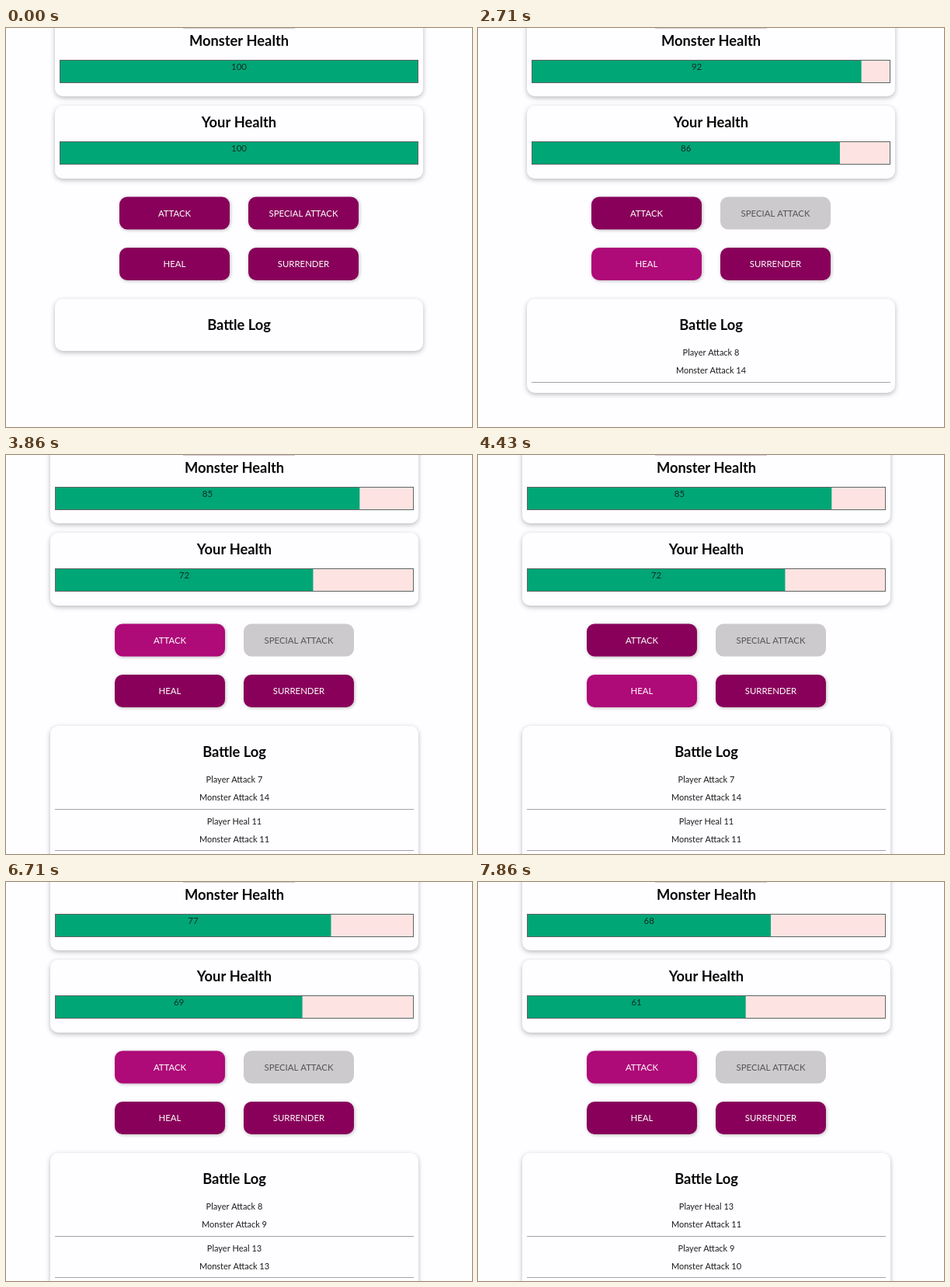
An HTML page with a canvas for the animation above (8000 ms loop, 600 by 514 pixels).

```html
<!DOCTYPE html>
<html lang="en">
<head>
<meta charset="utf-8">
<title>Monster battle</title>
<style>
html, body { margin: 0; width: 100%; height: 100%; overflow: hidden; background: #fefdff; }
canvas { display: block; width: 600px; height: 514px; }
</style>
</head>
<body>
<canvas id="stage" width="600" height="514"></canvas>
<script>
const ctx = document.getElementById('stage').getContext('2d');
const LOOP = 8000;
const FONT = 'Lato, "Open Sans", sans-serif';

// Time, player action, amount, monster damage
const rounds = [
  [2130, 'Attack', 8, 14],
  [2850, 'Heal', 11, 11],
  [3710, 'Attack', 7, 14],
  [4710, 'Heal', 13, 11],
  [5130, 'Heal', 15, 11],
  [5560, 'Heal', 13, 13],
  [5990, 'Attack', 8, 9],
  [6990, 'Attack', 9, 10],
  [7420, 'Heal', 13, 11]
];

// Time and the button under the pointer from then on
const hovers = [
  [0, ''], [1285, 'ATTACK'], [2425, 'HEAL'], [3425, 'ATTACK'], [4425, 'HEAL'],
  [5850, 'ATTACK'], [6285, 'HEAL'], [6705, 'ATTACK'], [7270, 'HEAL'], [7855, 'ATTACK']
];

function stateAt(t) {
  const log = rounds.filter(r => r[0] <= t);
  let monster = 100, player = 100;
  for (const [, action, amount, damage] of log) {
    if (action === 'Heal') player = Math.min(100, player + amount);
    else monster -= amount;
    player -= damage;
  }
  const hover = hovers.filter(h => h[0] <= t).pop()[1];
  return { log, monster, player, hover };
}

function shadow(color, x, y, blur) {
  ctx.shadowColor = color;
  ctx.shadowOffsetX = x;
  ctx.shadowOffsetY = y;
  ctx.shadowBlur = blur;
}

function box(x, y, w, h, r, fill) {
  ctx.fillStyle = fill;
  ctx.beginPath();
  ctx.roundRect(x, y, w, h, r);
  ctx.fill();
}

function text(str, x, y, size, color, weight = 400) {
  ctx.font = `${weight} ${size}px ${FONT}`;
  ctx.fillStyle = color;
  ctx.fillText(str, x, y);
}

function panel(title, cx, y, h, titleY) {
  ctx.save();
  shadow('rgba(0,0,0,.28)', 0, 2, 6);
  box(cx - 237, y, 474, h, 10, '#fefdff');
  ctx.restore();
  text(title, cx, titleY, 18.3, '#080808', 700);
}

function bar(value, cx, y) {
  const x = cx - 231, w = 461 * value / 100;
  ctx.fillStyle = '#fde4e2';
  ctx.fillRect(x, y, 462, 30);
  ctx.fillStyle = '#00a676';
  ctx.fillRect(x + 0.5, y, w, 30);
  ctx.strokeStyle = '#5d6663';
  ctx.lineWidth = 1;
  ctx.strokeRect(x + 0.5, y + 0.5, 461, 29);
  text(value, x + 0.5 + w / 2, y + 13, 11.5, '#142b23');
}

function button(label, x, y, hover, disabled) {
  ctx.save();
  if (!disabled) shadow('rgba(0,0,0,.26)', 1, 1, 4);
  box(x, y, 142, 42, 10, disabled ? '#cccacc' : hover ? '#ae0a78' : '#88005a');
  ctx.restore();
  text(label, x + 71, y + 25, 11.4, disabled ? '#565456' : '#fff');
}

function battleLog(log, cx) {
  panel('Battle Log', cx, 349, 67 + 54 * log.length, 389);
  log.slice(-2).reverse().forEach(([, action, amount, damage], i) => {
    const y = 422 + i * 53.5;
    text(`Player ${action} ${amount}`, cx, y, 11, '#1c1c1c');
    text(`Monster Attack ${damage}`, cx, y + 23, 11, '#1c1c1c');
    ctx.fillStyle = '#a3a1a4';
    ctx.fillRect(cx - 231, Math.floor(y + 34), 462, 1);
  });
}

function draw(t) {
  const { log, monster, player, hover } = stateAt(t);
  const cx = log.length > 1 ? 294 : 300; // a scroll bar narrows the page
  const left = cx - 154, right = cx + 12;

  ctx.fillStyle = '#fefdff';
  ctx.fillRect(0, 0, 600, 514);
  ctx.textAlign = 'center';

  panel('Monster Health', cx, -20, 108, 23);
  bar(monster, cx, 41);
  panel('Your Health', cx, 100, 94, 128);
  bar(player, cx, 146);

  ctx.fillStyle = '#d0cbd4';
  ctx.fillRect(228, 0, 144, 1);

  button('ATTACK', left, 217.5, hover === 'ATTACK');
  button('SPECIAL ATTACK', right, 217.5, false, log.length % 4 !== 0);
  button('HEAL', left, 283, hover === 'HEAL');
  button('SURRENDER', right, 283);

  battleLog(log, cx);
}

const start = performance.now();
function tick() {
  draw((performance.now() - start) % LOOP);
  requestAnimationFrame(tick);
}
tick();
</script>
</body>
</html>
```
